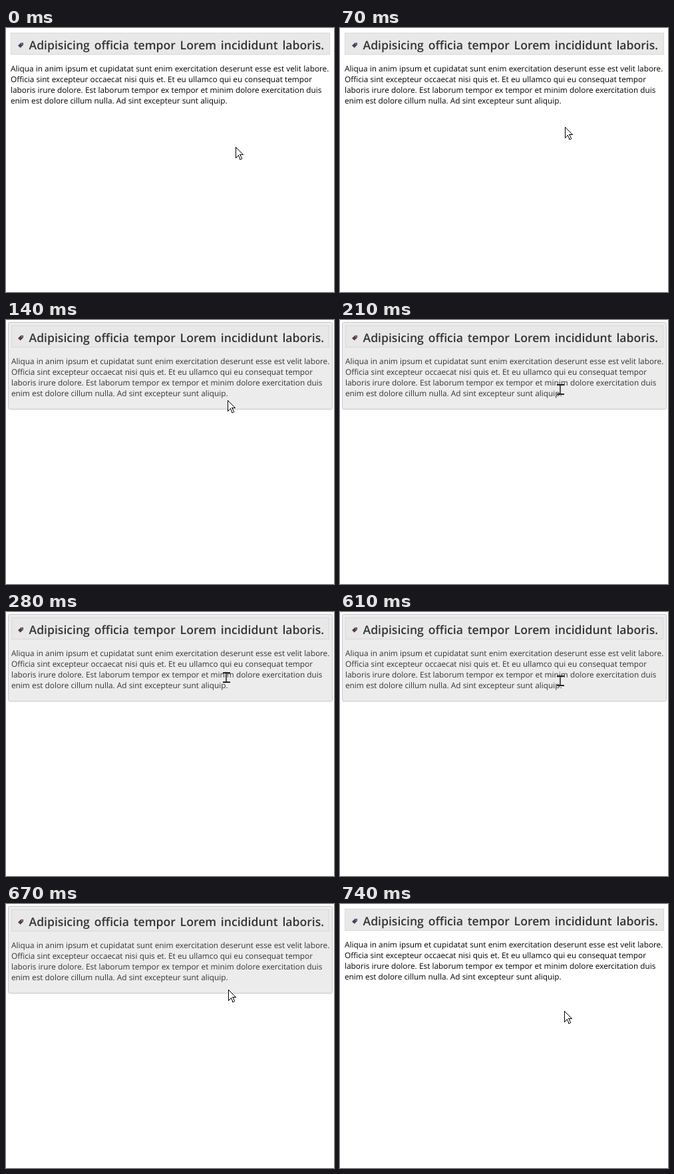
An HTML page that plays this animation: 493 by 395 pixels, repeating every 1270 ms.

```html
<!DOCTYPE html>
<html lang="la">
<head>
<meta charset="utf-8">
<title>Card hover</title>
<style>
  html, body { margin: 0; width: 100%; height: 100%; overflow: hidden; background: #fff; }
  svg { display: block; width: 493px; height: 395px; }
  text {
    font-family: "Open Sans", "Noto Sans", sans-serif;
    font-variant-ligatures: none;
    text-rendering: geometricPrecision;
    white-space: pre;
  }
  .title { font-size: 17.6px; font-weight: 600; word-spacing: 2.2px; fill: #333; }
  .copy { font-size: 11.8px; word-spacing: .13px; }
  .bar { fill: #e8e8e8; stroke: #d9d9d9; }

  .rest, .hover, .head, .copy, .tag, .arrow, .beam { animation: 1270ms step-end infinite; }
  .rest { animation-name: rest; }
  .hover { animation-name: hover; }
  .head { animation-name: head; }
  .copy { animation-name: copy; }
  .tag { animation-name: tag; }
  .arrow { animation-name: arrow; }
  .beam { animation-name: beam; }

  /* pointer is over the card from 140 ms to 740 ms */
  @keyframes rest  { 0%, 58.26% { opacity: 1; } 11.02% { opacity: 0; } }
  @keyframes hover { 0%, 58.26% { opacity: 0; } 11.02% { opacity: 1; } }
  @keyframes head  { 0%, 58.26% { transform: none; } 11.02% { transform: translate(0, 1px); } }
  @keyframes copy  {
    0%, 58.26% { transform: none; fill: #000; }
    11.02% { transform: translate(1px, 1px); fill: #333; }
  }
  @keyframes tag   { 0%, 58.26% { fill: #43425a; } 11.02% { fill: #573c40; } }

  @keyframes arrow {
    0%     { transform: translate(345px, 178px); opacity: 1; }
    5.51%  { transform: translate(338px, 148px); opacity: 1; }
    11.02% { transform: translate(333px, 120px); opacity: 1; }
    16.53% { transform: translate(333px, 120px); opacity: 0; }
    52.75% { transform: translate(334px, 128px); opacity: 1; }
    58.26% { transform: translate(337px, 160px); opacity: 1; }
  }
  @keyframes beam {
    0%     { transform: translate(331px, 104px); opacity: 0; }
    16.53% { transform: translate(331px, 104px); opacity: 1; }
    22.04% { transform: translate(331px, 98px); opacity: 1; }
    48.03% { transform: translate(331px, 103px); opacity: 1; }
    52.75% { transform: translate(331px, 103px); opacity: 0; }
  }
</style>
</head>
<body>
<svg viewBox="0 0 493 395">
  <rect class="rest bar" x="7.5" y="7.5" width="479" height="32"/>
  <g class="hover">
    <rect x="3.5" y="3.5" width="487" height="130" rx="2" fill="#ececec" stroke="#c8c8c8"/>
    <rect class="bar" x="8.5" y="8.5" width="477" height="32"/>
  </g>

  <g class="head">
    <path class="tag" d="M18 26.3 22.2 22.2 25.4 22 26.2 23 25.8 25.6 21.6 29.8Z"/>
    <circle cx="24" cy="24" r=".8" fill="#ddd"/>
    <text class="title" x="34.5" y="32">Adipisicing officia tempor Lorem incididunt laboris.</text>
  </g>

  <g class="copy">
    <text x="7" y="65">Aliqua in anim ipsum et cupidatat sunt enim exercitation deserunt esse est velit labore.</text>
    <text x="7" y="81">Officia sint excepteur occaecat nisi quis et. Et eu ullamco qui eu consequat tempor</text>
    <text x="7" y="97">laboris irure dolore. Est laborum tempor ex tempor et minim dolore exercitation duis</text>
    <text x="7" y="113">enim est dolore cillum nulla. Ad sint excepteur sunt aliquip.</text>
  </g>

  <path class="arrow" d="M.5 .5V16.5L4.5 12.5 7 18.5H8.5L9.5 17.5 7 11.5H11.5Z" fill="#fff" stroke="#000" shape-rendering="crispEdges"/>
  <g class="beam">
    <path d="M0-7V7" stroke="#555" stroke-width="2"/>
    <path d="M-5-7H6M-5 7H6" stroke="#222" stroke-width="2"/>
  </g>
</svg>
</body>
</html>
```
